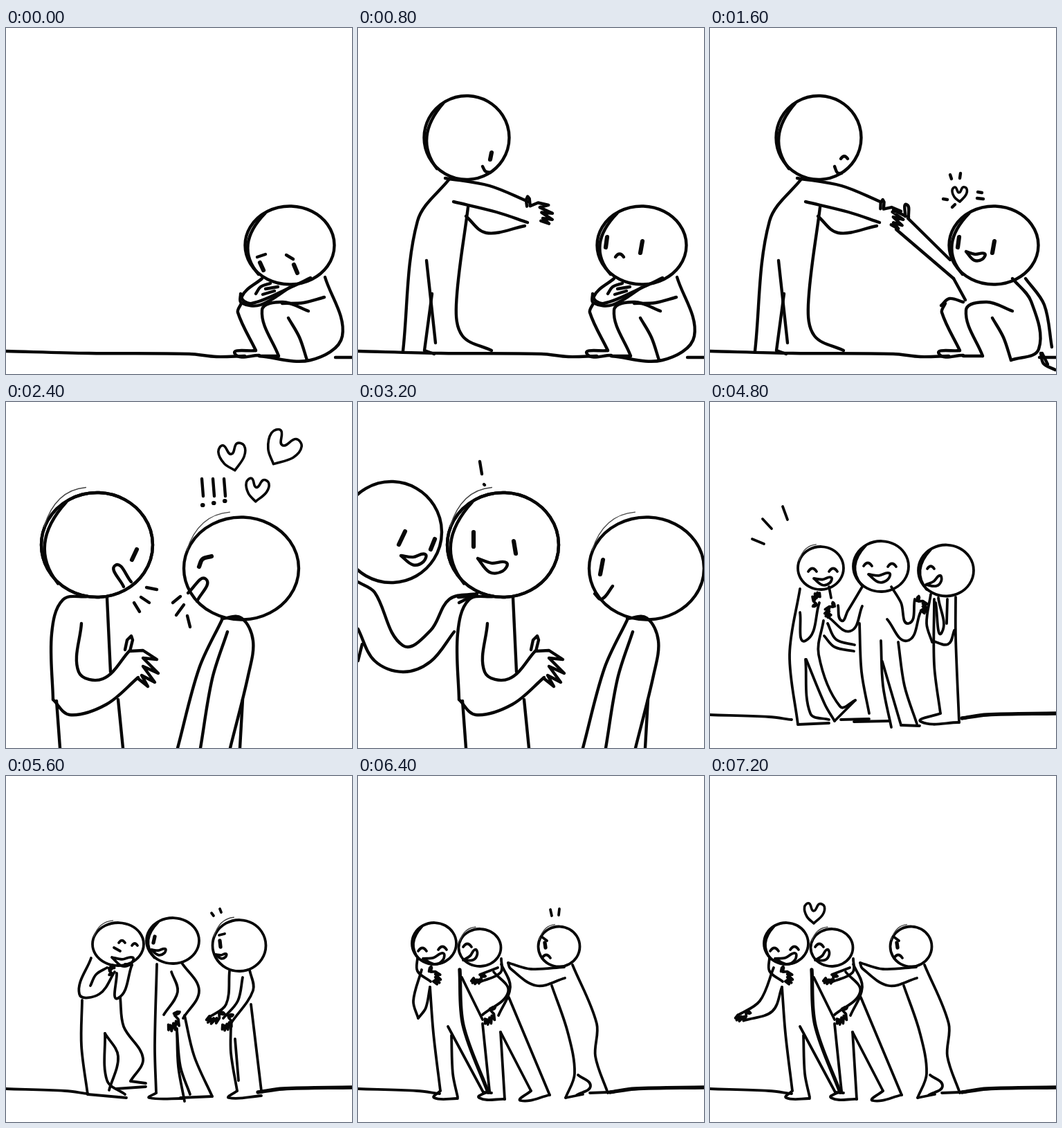
Write an HTML page that moves like this. It is 500x500 px and loops after 8 s.

```html
<!DOCTYPE html>
<html lang="en">
<head>
<meta charset="utf-8">
<title>Friends</title>
<style>
  html, body { margin: 0; width: 100%; height: 100%; overflow: hidden; background: #fff; }
  svg { display: block; width: 100%; height: 100%; fill: none; stroke: #060606; stroke-linecap: round; stroke-linejoin: round; }
  g[style] { visibility: hidden; animation: show 8s step-end infinite; animation-delay: calc(var(--i) * .8s - 8s); }
  @keyframes show { 0% { visibility: visible; } 10%, 100% { visibility: hidden; } }
</style>
</head>
<body>
<svg id="stage" viewBox="0 0 500 500"></svg>
<script>
let out = '', width = 4.4;

const add = (d, w = width, color = '#060606') => {
  out += `<path d="${d}" stroke-width="${w}" stroke="${color}"/>`;
};

// smooth stroke through x, y pairs
function curve(n) {
  const p = [];
  for (let i = 0; i < n.length; i += 2) p.push([n[i], n[i + 1]]);
  const slope = i => {
    const a = p[i - 1] || p[i], b = p[i + 1] || p[i];
    const x = b[0] - a[0], y = b[1] - a[1], l = Math.hypot(x, y) || 1;
    return [x / l, y / l];
  };
  let d = 'M' + p[0];
  for (let i = 1; i < p.length; i++) {
    const a = p[i - 1], b = p[i], s = slope(i - 1), e = slope(i);
    const l = Math.hypot(b[0] - a[0], b[1] - a[1]) / 3;
    d += `C${a[0] + s[0] * l},${a[1] + s[1] * l} ${b[0] - e[0] * l},${b[1] - e[1] * l} ${b}`;
  }
  return d;
}
const pen = (...n) => add(curve(n));
const bold = (...n) => add(curve(n), width * 1.4);

function head(x, y, rx, ry, sketch) {
  add(`M${x - rx},${y}a${rx},${ry} 0 1 1 0,.01`);
  const at = (u, v) => `${x + u * rx},${y + v * ry} `;
  if (sketch === 'thick') add('M' + at(-.55, -.82) + 'Q' + at(-1.25, 0) + at(-.7, .74));
  if (sketch === 'stray') add('M' + at(-.95, -.35) + 'Q' + at(-.75, -1.05) + at(-.2, -1.1), 1.4, '#444');
}

// a unit shape placed, turned and scaled
function place(points, x, y, s, deg = 0, flip = 1) {
  const c = Math.cos(deg * Math.PI / 180) * s, k = Math.sin(deg * Math.PI / 180) * s;
  return points.map(([u, v]) => [x + u * flip * c - v * k, y + u * flip * k + v * c]);
}
const fingers = [[-4, -2], [-1, -16], [5, -22], [7, -16], [3, 0], [22, -1], [42, 12], [22, 10], [44, 32], [22, 22], [39, 45], [20, 35], [29, 51], [14, 39]];
const hand = (...spot) => add('M' + place(fingers, ...spot).join('L'));

const lobes = [[0, 1], [-.7, .4], [-1, -.5], [-.6, -.9], [-.1, -.2], [.4, -.9], [.9, -.7], [.8, .1], [0, 1]];
const heart = (...spot) => add(curve(place(lobes, ...spot).flat()), 3.6);

const lips = [[0, 0], [.5, .06], [1, -.06], [.93, .25], [.5, .38], [0, 0]];
const smile = (...spot) => add(curve(place(lips, ...spot).flat()));
const lid = (x, y, w = 12) => add(`M${x},${y}q${w / 2},${-w * .75} ${w},0`);

function shift(dx, draw) {
  out += `<g transform="translate(${dx})">`;
  draw();
  out += '</g>';
}

function floor() {
  pen(0, 467, 120, 470, 265, 471, 304, 475, 345, 474);
  pen(476, 476, 500, 476);
}
function horizon() {
  pen(0, 452, 85, 455, 118, 459);
  bold(364, 457, 400, 452, 500, 450);
}

function crouch() {
  head(410, 314, 64.5, 56.5, 'thick');
  pen(340, 398, 335, 411, 361, 466);
  pen(361, 466, 331, 471, 366, 473);
  pen(394, 474, 370, 408, 400, 396, 437, 409);
  pen(394, 474, 366, 474);
  pen(408, 419, 424, 447, 435, 480);
}
function hugKnees() {
  crouch();
  pen(370, 362, 341, 388, 355, 398, 413, 374, 440, 361);
  pen(361, 384, 368, 374, 382, 369);
  pen(375, 377, 393, 374);
  pen(371, 385, 388, 380);
  pen(339, 384, 340, 397, 368, 400, 410, 375);
  pen(399, 398, 430, 397, 460, 389);
  pen(461, 360, 486, 445, 440, 480, 366, 474);
}
function helper() {
  head(157, 158.5, 61.5, 60.5, 'thick');
  pen(133, 217, 86, 279, 65, 467);
  pen(126, 217, 190, 228, 246, 251);
  pen(138, 251, 200, 266, 245, 281);
  pen(159, 259, 142, 400, 151, 445, 193, 466);
  pen(156, 272, 185, 296, 241, 286);
  pen(99, 336, 106, 400, 112, 455);
  pen(107, 384, 96, 466);
  pen(96, 466, 110, 471);
}

function pal() {
  head(131.5, 206.5, 80.5, 75.5, 'thick');
  head(131.5, 206.5, 80.5, 75.5, 'stray');
  pen(118, 281, 82, 286, 66, 335, 68, 430);
  pen(68, 430, 92, 452, 145, 437, 191, 398);
  pen(109, 320, 105, 390, 140, 400, 178, 360);
  pen(146, 283, 151, 390);
  pen(73, 432, 78, 500);
  pen(162, 430, 169, 500);
  hand(176, 360, 1);
}
function mate() {
  head(340, 240.5, 83, 74, 'stray');
  pen(312, 315, 279, 385, 248, 500);
  pen(320, 332, 298, 400, 281, 500);
  pen(312, 313, 340, 312, 357, 345, 350, 395, 324, 500);
  pen(342, 430, 338, 500);
}

function trio() {
  head(160, 240, 33, 31, 'stray');
  head(247, 237.5, 40, 36.5, 'thick');
  head(341, 243.5, 40, 37, 'thick');

  pen(130, 270, 115, 365, 127, 466);
  pen(127, 466, 172, 464);
  pen(172, 459, 145, 450, 138, 372);
  pen(139, 372, 166, 437, 180, 461);
  pen(180, 461, 210, 431);
  pen(210, 431, 188, 440, 157, 365, 164, 316);
  pen(172, 267, 175, 283);
  pen(170, 320, 182, 343, 209, 351);
  pen(165, 338, 180, 354, 208, 360);
  pen(130, 304, 138, 345, 158, 290);
  hand(154, 292, .28, -135);

  pen(220, 267, 199, 302, 190, 316, 185, 294);
  pen(171, 311, 203, 331, 220, 295);
  hand(179, 296, .3, 0, -1);
  pen(216, 320, 219, 390, 230, 450);
  pen(230, 458, 189, 459);
  pen(208, 462, 258, 461);
  pen(262, 267, 276, 290, 287, 320, 296, 285);
  pen(256, 314, 285, 345, 304, 304);
  hand(300, 288, .34);
  pen(247, 345, 250, 410, 262, 470);
  pen(249, 375, 276, 467);
  pen(276, 467, 303, 468);
  pen(299, 465, 281, 410, 272, 347);

  pen(319, 278, 313, 320, 321, 347);
  pen(324, 285, 324, 380, 333, 450);
  pen(333, 450, 305, 462, 360, 463);
  pen(355, 282, 355, 340, 360, 463);
  pen(353, 330, 344, 350, 321, 345);
  pen(330, 283, 335, 333, 326, 290);
  pen(343, 285, 342, 320);
}

function chat() {
  head(162, 243, 37, 31, 'stray');
  head(241, 238, 38, 33, 'thick');
  head(337, 245, 38.5, 37, 'stray');

  pen(123, 263, 106, 315, 135, 315, 157, 283);
  pen(122, 303, 130, 287, 146, 277);
  hand(153, 285, .2, -135);
  pen(160, 285, 162, 321, 182, 273);
  pen(182, 273, 172, 272);
  pen(110, 324, 109, 390, 118, 460);
  pen(118, 460, 174, 465);
  pen(172, 460, 146, 440, 143, 372);
  pen(143, 372, 162, 405, 149, 454);
  pen(165, 320, 170, 362, 198, 408, 180, 441);
  pen(180, 441, 202, 444);
  pen(202, 449, 159, 452);

  pen(218, 272, 215, 390, 217, 458);
  pen(217, 458, 207, 465, 255, 466);
  pen(254, 270, 279, 310, 256, 350);
  pen(239, 283, 248, 312, 228, 345);
  hand(243, 345, .4, 50);
  pen(247, 365, 249, 420, 258, 470);
  pen(247, 368, 252, 420, 266, 460);
  pen(258, 346, 272, 405, 298, 463);
  pen(298, 463, 252, 465);

  pen(323, 282, 318, 330, 293, 349);
  hand(308, 342, .36, 90);
  pen(342, 291, 335, 325, 314, 350);
  hand(321, 348, .34, 55);
  pen(326, 356, 357, 310, 352, 280);
  pen(325, 360, 325, 400, 334, 455);
  pen(334, 455, 322, 465, 369, 462);
  pen(369, 455, 354, 330);
  pen(331, 380, 336, 440);
}

function cuddle() {
  head(110, 242, 32, 30, 'thick');
  head(176, 248, 30.5, 27, 'stray');

  pen(86, 262, 86, 282, 105, 297);
  hand(104, 283, .35);
  pen(104, 305, 109, 372, 119, 455);
  pen(119, 455, 110, 465, 144, 466);
  pen(144, 464, 137, 430, 135, 375);
  pen(130, 362, 181, 457);
  bold(147, 280, 152, 360, 188, 457);
  pen(181, 457, 193, 458);

  pen(150, 291, 180, 352);
  pen(207, 264, 206, 284, 175, 298);
  pen(202, 277, 176, 287);
  hand(178, 288, .28, 90);
  pen(196, 283, 217, 312, 180, 345);
  hand(191, 338, .36, 50);
  pen(207, 272, 220, 305, 203, 346);
  pen(180, 358, 190, 455);
  pen(190, 455, 175, 465, 212, 467);
  pen(212, 467, 206, 370);
  pen(206, 370, 250, 455);
  pen(250, 455, 235, 469, 277, 461);
  pen(277, 461, 218, 320);
}
function onlooker() {
  head(290.5, 246.5, 30, 29, 'stray');
  pen(298, 276, 250, 279, 217, 270);
  pen(217, 270, 220, 278, 258, 303, 299, 292);
  pen(310, 273, 345, 358, 343, 405, 361, 458);
  pen(280, 303, 303, 370, 313, 430, 300, 465);
  pen(300, 465, 325, 460);
  pen(318, 432, 336, 448, 316, 461);
  pen(335, 458, 361, 457);
  lid(266, 263);
  bold(270, 241, 271, 248);
  pen(265, 232, 273, 238);
  lid(87, 253); lid(116, 251);
  smile(94, 264, 30, -12);
  lid(152, 247);
  smile(152, 266, 23, -38);
}

function sitterEyes() {
  bold(360, 302, 358, 317);
  bold(411, 308, 408, 325);
}

const scenes = [
  () => {
    floor(); hugKnees();
    pen(363, 331, 375, 327);
    pen(405, 328, 415, 334);
    bold(367, 339, 372, 350);
    bold(416, 342, 421, 354);
  },
  () => {
    floor(); hugKnees(); helper(); sitterEyes();
    lid(372, 331);
    bold(193, 180, 191, 190);
    pen(180, 200, 184, 207, 191, 209);
    hand(247, 258, .65, -20);
  },
  () => {
    floor(); crouch(); helper(); sitterEyes();
    smile(370, 323, 27, 10);
    pen(366, 396, 346, 391, 334, 401);
    pen(286, 275, 347, 335);
    pen(269, 291, 352, 362);
    pen(352, 362, 369, 393);
    pen(437, 362, 464, 395, 475, 464, 435, 480);
    pen(456, 362, 483, 400, 494, 461);
    pen(478, 470, 482, 485, 499, 494);
    pen(480, 470, 488, 486);
    hand(249, 262, .62, -10);
    pen(265, 263, 283, 272);
    pen(282, 272, 284, 255, 287, 274);
    lid(189, 189, 10);
    pen(180, 200, 184, 209, 190, 210);
    heart(361, 240, 11);
    pen(347, 212, 349, 218); pen(362, 210, 361, 217);
    pen(387, 237, 393, 238); pen(386, 246, 395, 247);
    pen(337, 247, 343, 248); pen(350, 259, 354, 255);
  },
  () => {
    pal(); mate();
    bold(189, 213, 182, 228);
    bold(279, 238, 284, 227, 297, 223);
    pen(181, 260, 158, 236, 170, 267);
    pen(263, 276, 289, 256, 276, 288);
    pen(185, 290, 193, 303); pen(195, 282, 207, 290); pen(203, 268, 218, 271);
    pen(241, 290, 252, 281); pen(246, 308, 257, 293); pen(262, 309, 266, 325);
    for (let i = 0; i < 3; i++) {
      const x = 283 + i * 16;
      pen(x, 111, x + 2, 136);
      bold(x + 1, 149 - i * 3, x + 1.5, 149 - i * 3);
    }
    heart(328, 79, 20, -8);
    heart(399, 68, 25, 30);
    heart(363, 127, 17, 8);
  },
  () => {
    shift(78, pal);
    shift(77, mate);
    head(48, 188, 73, 73);
    bold(68, 187, 59, 206); bold(111, 198, 105, 213);
    bold(167, 188, 167, 209); bold(225, 201, 228, 219);
    bold(354, 228, 350, 249);
    smile(62, 222, 35);
    smile(173, 226, 42, 12);
    pen(342, 277, 352, 285, 368, 266);
    pen(176, 86, 179, 104); pen(182, 119, 183, 120);
    pen(0, 260, 24, 275, 65, 352, 105, 330, 132, 285, 172, 277);
    pen(0, 328, 24, 374, 65, 390, 105, 375, 139, 332);
    pen(0, 374, 6, 350);
    pen(145, 282, 172, 280);
    pen(146, 290, 160, 283);
  },
  () => {
    horizon(); trio();
    pen(142, 241, 157, 248); pen(171, 249, 186, 243);
    smile(152, 255, 22);
    lid(222, 237); lid(257, 238);
    smile(230, 250, 28, -3);
    bold(319, 236, 316, 247);
    lid(317, 227, 8);
    smile(313, 265, 22, -30);
  },
  () => {
    horizon(); trio();
    lid(142, 245); lid(172, 245);
    smile(150, 255, 25);
    lid(222, 237); lid(257, 238);
    smile(229, 249, 30);
    lid(314, 241, 10);
    smile(312, 264, 24, -30);
    pen(61, 198, 78, 205); pen(76, 169, 89, 183); pen(105, 151, 112, 170);
  },
  () => {
    horizon(); chat();
    lid(163, 241, 9); lid(182, 245, 8);
    pen(156, 248, 165, 253);
    smile(153, 262, 30, 4);
    bold(215, 232, 213, 241);
    smile(210, 251, 20);
    bold(309, 238, 310, 247);
    pen(308, 230, 316, 228);
    smile(303, 258, 15);
    pen(297, 198, 300, 202); pen(309, 192, 311, 197);
  },
  () => {
    horizon(); cuddle(); onlooker();
    pen(92, 280, 80, 325, 87, 350);
    pen(87, 350, 98, 335, 104, 305);
    pen(278, 193, 280, 202); pen(291, 192, 290, 201);
  },
  () => {
    horizon(); cuddle(); onlooker();
    pen(92, 277, 72, 325, 40, 346);
    pen(104, 305, 90, 340, 50, 353);
    hand(52, 341, .3, 90);
    heart(151, 198, 15, 4);
  }
];

document.getElementById('stage').innerHTML = scenes.map((draw, i) => {
  out = '';
  width = i < 5 ? 4.4 : 3.8;
  draw();
  return `<g style="--i:${i}">${out}</g>`;
}).join('');
</script>
</body>
</html>
```
